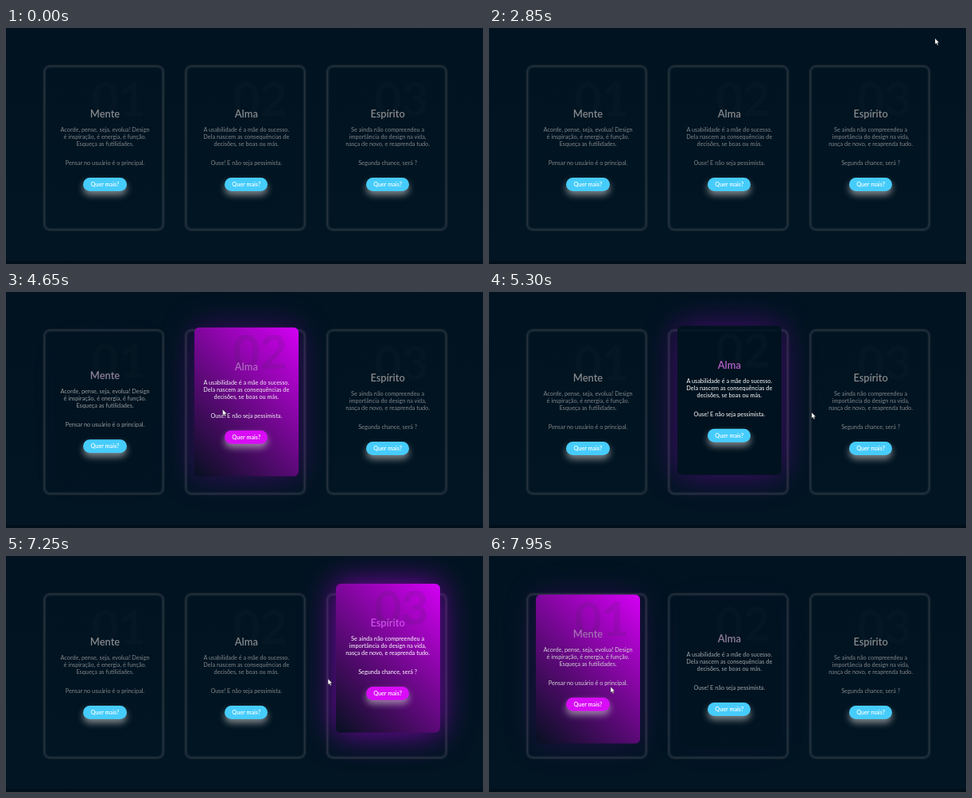
An HTML page that plays this animation: 600x298 px, repeating every 8 s.

```html
<!DOCTYPE html>
<html lang="pt">
<head>
<meta charset="utf-8">
<title>Mente, Alma, Espírito</title>
<style>
  html, body { margin: 0; width: 100%; height: 100%; overflow: hidden; background: #011421; }
  #stage {
    position: absolute; left: 0; top: 0; width: 600px; height: 298px; overflow: hidden;
    background: linear-gradient(#011320, #011522);
    font-family: Lato, "Open Sans", sans-serif;
  }
  #stage::after {
    content: ""; position: absolute; left: 0; right: 0; bottom: 0; height: 4px; background: #010f1b;
  }
  .frame {
    position: absolute; top: 47.5px; width: 148px; height: 205px;
    border: 1.5px solid rgba(92, 94, 98, .4); border-radius: 7px;
    box-shadow: 0 0 3px rgba(150, 150, 150, .5), inset 0 0 3px rgba(140, 140, 140, .35);
  }
  .box {
    position: absolute; top: 58.5px; width: 131px; height: 188px;
    border-radius: 6px; text-align: center; white-space: nowrap;
  }
  .box > * { position: absolute; left: 0; right: 0; margin: 0; }
  .num {
    top: -5px; padding-right: 14px; text-align: right; font: 700 59px/70px Lato, sans-serif;
    color: rgba(40, 48, 56, .12);
  }
  h2 { top: 41px; font-size: 12.9px; line-height: 17px; font-weight: 600; }
  p { font-size: 7.32px; line-height: 9px; }
  .btn {
    top: 130.7px; width: 54.4px; height: 16.4px; border-radius: 9px; color: #fff;
    font-size: 7.25px; line-height: 17px; font-weight: 600;
    box-shadow: 0 5px 9px rgba(205, 205, 205, .6);
  }
  .box > .btn { left: 38.3px; right: auto; }
  #cursor { position: absolute; left: 0; top: 0; width: 7.2px; height: 10.8px; overflow: visible; }
</style>
</head>
<body>
<div id="stage"></div>
<script>
const LOOP = 8000, FADE = 500, RISE = 24, STEP = 177.8;
const stage = document.getElementById('stage');

// hover: [enter, leave] times in ms
const cards = [
  { title: 'Mente',
    lines: ['Acorde, pense, seja, evolua! Design', 'é inspiração, é energia, é função.',
      'Esqueça as futilidades.', 'Pensar no usuário é o principal.'],
    hover: [[4110, 4400], [7822, 9000]] },
  { title: 'Alma',
    lines: ['A usabilidade é a mãe do sucesso.', 'Dela nascem as consequências de',
      'decisões, se boas ou más.', 'Ouse! E não seja pessimista.'],
    hover: [[4480, 5195], [7320, 7700]] },
  { title: 'Espírito',
    lines: ['Se ainda não compreendeu a', 'importância do design na vida,',
      'nasça de novo, e reaprenda tudo.', 'Segunda chance, será ?'],
    hover: [[5310, 5745], [6730, 7265]] }
];

// pointer strokes: [time, x, y]
const strokes = [
  [[1150, 591, 6], [1300, 540, 3], [1450, 486, -14]],
  [[2850, 562, 13], [3120, 290, 20], [3400, -8, 27]],
  [[4000, 13, 128], [4110, 48, 132], [4400, 199, 143], [4480, 225, 145], [4750, 300, 150],
    [5195, 377, 151], [5300, 405.5, 152], [5500, 480, 158], [5745, 556, 164], [5860, 602, 168]],
  [[6650, 602, 150], [6730, 555, 153], [6950, 490, 157], [7250, 405.5, 155], [7320, 377, 156],
    [7700, 225, 162], [7822, 199, 164], [7950, 153, 165], [8001, 153, 165]]
];

const lerp = (a, b, k) => a + (b - a) * k;
const mix = (a, b, k) => `rgb(${a.map((v, i) => Math.round(lerp(v, b[i], k)))})`;

// CSS "ease": cubic-bezier(.25, .1, .25, 1)
function ease(x) {
  if (x <= 0) return 0;
  if (x >= 1) return 1;
  const bez = (a, b, u) => 3 * a * u * (1 - u) ** 2 + 3 * b * u * u * (1 - u) + u ** 3;
  let lo = 0, hi = 1;
  for (let i = 0; i < 24; i++) {
    const mid = (lo + hi) / 2;
    if (bez(.25, .25, mid) < x) lo = mid; else hi = mid;
  }
  return bez(.1, 1, lo);
}

function add(tag, cls, parent, text = '') {
  const el = document.createElement(tag);
  el.className = cls;
  el.textContent = text;
  return parent.appendChild(el);
}

cards.forEach((c, i) => {
  add('div', 'frame', stage).style.left = 48 + STEP * i + 'px';
});
cards.forEach((c, i) => {
  c.box = add('div', 'box', stage);
  c.box.style.left = 59 + STEP * i + 'px';
  add('div', 'num', c.box, '0' + (i + 1));
  c.head = add('h2', '', c.box, c.title);
  c.text = c.lines.map((line, n) => {
    const p = add('p', '', c.box, line);
    p.style.top = 65.2 + n * 9 + (n === 3 ? 15 : 0) + 'px';
    return p;
  });
  c.btn = add('div', 'btn', c.box, 'Quer mais?');
});

stage.insertAdjacentHTML('beforeend',
  `<svg id="cursor" viewBox="0 0 8 12"><path d="M0 0V8.4L1.9 6.7 3.2 9.7 4.6 9.1 3.3 6.2H5.8Z"
    fill="#fff" stroke="#111" stroke-width=".4"/></svg>`);
const cursor = document.getElementById('cursor');

function hoverState(spans, t) {
  let level = 0, on = false;
  for (const [enter, leave] of spans) {
    if (t < enter) break;
    on = t < leave;
    const peak = ease((Math.min(t, leave) - enter) / FADE);
    level = on ? peak : peak * (1 - ease((t - leave) / (FADE * peak)));
  }
  return { level, on };
}

function drawCard(c, t) {
  const { level, on } = hoverState(c.hover, t);
  const s = c.box.style;
  s.transform = `translateY(${-RISE * level}px)`;
  s.background = on
    ? 'linear-gradient(45deg, #06101f, #d400f4)'
    : `rgba(1, 18, 31, ${.85 * Math.min(1, level * 1.8)})`;
  s.boxShadow = `0 0 42px rgba(150, 0, 200, ${.85 * level ** 1.5})`;
  c.head.style.color = mix([134, 137, 140], [204, 78, 232], level);
  const ink = mix([130, 134, 138], [255, 255, 255], Math.min(1, level * 1.5));
  c.text.forEach(p => { p.style.color = ink; });
  c.btn.style.background = on ? '#d80cf6' : '#46ccfb';
}

function drawCursor(t) {
  const path = strokes.find(p => t >= p[0][0] && t < p[p.length - 1][0]);
  cursor.style.display = path ? 'block' : 'none';
  if (!path) return;
  const n = path.findIndex(p => p[0] > t);
  const a = path[n - 1], b = path[n], k = (t - a[0]) / (b[0] - a[0]);
  cursor.style.transform = `translate(${lerp(a[1], b[1], k)}px, ${lerp(a[2], b[2], k)}px)`;
}

const start = performance.now();
function tick(now) {
  const t = Math.max(0, now - start) % LOOP;
  cards.forEach(c => drawCard(c, t));
  drawCursor(t);
  requestAnimationFrame(tick);
}
tick(start);
</script>
</body>
</html>
```
